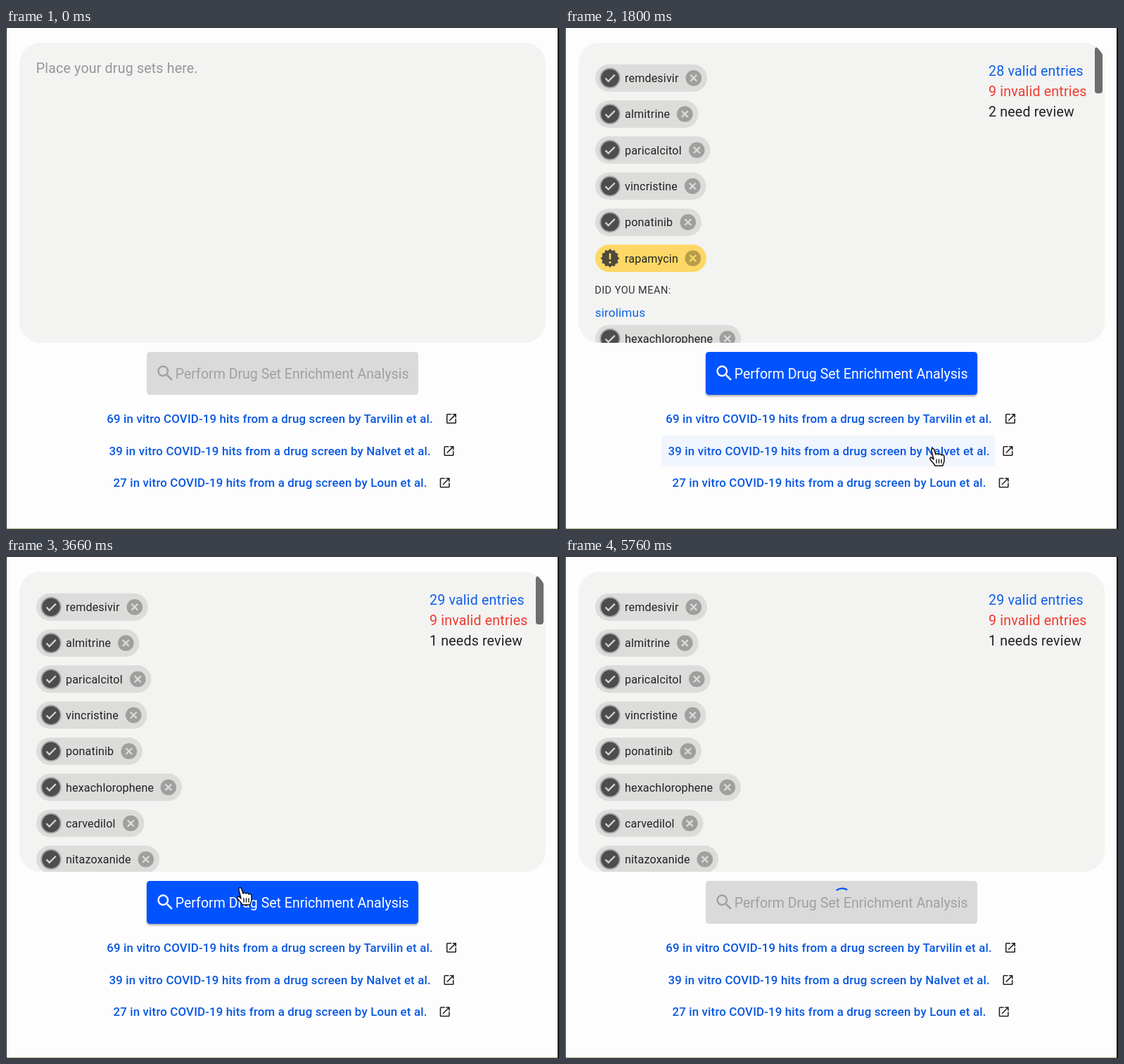
An HTML page that plays this animation: 786 by 713 pixels, repeating every 5.78 s.

```html
<!DOCTYPE html>
<html lang="en">
<head>
<meta charset="utf-8">
<title>Drug set enrichment</title>
<style>
  html, body { margin: 0; width: 100%; height: 100%; overflow: hidden; background: #fdfdfd; }
  svg { display: block; }
  text { font-family: Roboto, sans-serif; white-space: pre; }
  .body { font-size: 19.6px; letter-spacing: .00938em; }
  .chip { font-size: 16.1px; letter-spacing: .01em; fill: #222; }
  .link { font-size: 16.85px; letter-spacing: .01em; font-weight: 500; fill: #0957e0; }
</style>
</head>
<body>
<svg id="stage" width="786" height="713" viewBox="0 0 786 713">
  <defs>
    <clipPath id="panelClip"><rect x="19" y="21" width="748" height="427" rx="30"/></clipPath>
    <clipPath id="rowClip"><rect x="137" y="580" width="474" height="44" rx="4"/></clipPath>
    <filter id="shadow" x="-5%" y="-20%" width="110%" height="150%">
      <feDropShadow dx="0" dy="2" stdDeviation="1.5" flood-opacity=".35"/>
    </filter>
  </defs>
  <rect width="786" height="713" fill="#fdfdfd"/>
  <rect x="19" y="21" width="748" height="427" rx="30" fill="#f3f3f2"/>

  <text id="hint" class="body" x="42.7" y="64" fill="#979797">Place your drug sets here.</text>
  <g id="results" clip-path="url(#panelClip)">
    <g id="before"></g>
    <g id="after"></g>
    <text class="body" id="valid" x="602" y="67.5" fill="#0f5fe6"></text>
    <text class="body" x="602" y="96.5" fill="#ee3b2e">9 invalid entries</text>
    <text class="body" id="review" x="602" y="125.5" fill="#222"></text>
    <rect id="bar" x="753" y="27" width="11" rx="4" fill="#6d6d6d"/>
  </g>

  <rect id="button" x="200" y="461" width="386" height="61" rx="4.5"/>
  <g id="label">
    <path transform="translate(211.6 476.6) scale(1.23)" d="M15.5 14h-.79l-.28-.27A6.47 6.47 0 0 0 16 9.5 6.5 6.5 0 1 0 9.5 16c1.61 0 3.09-.59 4.23-1.57l.27.28v.79l5 4.99L20.49 19l-4.99-5zm-6 0C7.01 14 5 11.99 5 9.5S7.01 5 9.5 5 14 7.01 14 9.5 11.99 14 9.5 14z"/>
    <text x="240.8" y="498.5" font-size="19.55">Perform Drug Set Enrichment Analysis</text>
  </g>
  <path id="spinner" fill="none" stroke="#0957f0" stroke-width="2.4"/>

  <g id="hovers"></g>
  <g clip-path="url(#rowClip)"><circle id="ripple" cx="524.5" cy="602" fill="#0057ff"/></g>
  <g id="links"></g>

  <path d="M.5 0V713" stroke="#222"/>
  <path d="M785 0V713" stroke="#111" stroke-width="2"/>
  <path d="M1 712.5H784" stroke="#b5b58c"/>

  <g id="cursor" stroke-linejoin="round" stroke-linecap="round">
    <g id="hand">
      <path d="M-3 2c-1-4 3-5 4-1l2 6c1-2 4-1 4 0 1-1 4-1 4 1 2-1 4 0 4 2v6c0 3-2 4-2 7h-11c-1-3-4-5-7-9-1-2 1-4 3-2l2 2z" fill="#fff" stroke="#111" stroke-width="1.5"/>
      <path d="M4 14v5M7.5 14v5M11 14v5" stroke="#111" stroke-width="1.4"/>
    </g>
    <g id="beam" fill="none">
      <path d="M-4-11q4 0 4 3V8q0 3-4 3M4-11q-4 0-4 3M4 11q-4 0-4-3M-2 1H2" stroke="#fff" stroke-width="4"/>
      <path d="M-4-11q4 0 4 3V8q0 3-4 3M4-11q-4 0-4 3M4 11q-4 0-4-3M-2 1H2" stroke="#111" stroke-width="1.8"/>
    </g>
    <path id="arrow" d="M0 0V19l4.5-4 3 7 3.5-1.5-3-7h6z" fill="#111" stroke="#fff" stroke-width="1.5"/>
  </g>
</svg>
<script>
const LOOP = 5780, FILLED = 1260, FIXED = 3000, LOADING = 4167;
const $ = id => document.getElementById(id);
const show = (id, on) => $(id).style.display = on ? '' : 'none';
const set = (id, attrs) => { for (const k in attrs) $(id).setAttribute(k, attrs[k]); };
const clamp = v => Math.min(1, Math.max(0, v));
const smooth = v => v * v * (3 - 2 * v);

function bezier(x1, y1, x2, y2) {
  const at = (a, b, u) => 3 * a * u * (1 - u) ** 2 + 3 * b * u * u * (1 - u) + u ** 3;
  return x => {
    let lo = 0, hi = 1;
    for (let i = 0; i < 22; i++) {
      const mid = (lo + hi) / 2;
      if (at(x1, x2, mid) < x) lo = mid; else hi = mid;
    }
    return at(y1, y2, lo);
  };
}
const inOut = bezier(.42, 0, .58, 1), standard = bezier(.4, 0, .2, 1);

// Chips: name and right edge
const first = [['remdesivir', 202], ['almitrine', 189.5], ['paricalcitol', 206.5], ['vincristine', 200.5], ['ponatinib', 194]];
const hexa = ['hexachlorophene', 250];
const rowY = i => 71.2 + i * 51.3;

const burst = Array.from({ length: 24 }, (_, i) => {
  const a = i * Math.PI / 12, r = i % 2 ? 11 : 13.4;
  return [r * Math.sin(a), -r * Math.cos(a)].map(v => v.toFixed(1));
}).join(' ');

function chip([name, right], y, warn) {
  const fill = warn ? '#fdd866' : '#dcdcdb';
  const icon = warn
    ? `<polygon points="${burst}" fill="#4e4a3c"/><path d="M0-7V1.5M0 4.5V7.2" stroke="${fill}" stroke-width="2.6"/>`
    : `<circle r="14.8" fill="#a9a9a9"/><circle r="12.8" fill="#4d4d4d"/>
       <path d="M-6.5 .3L-2.4 4.6 6.8-4.6" fill="none" stroke="#d2d2d2" stroke-width="2.3"/>`;
  return `<g transform="translate(0 ${y})">
    <rect x="43" y="-19.5" width="${right - 43}" height="39" rx="19.5" fill="${fill}"/>
    <g transform="translate(64 0)">${icon}</g>
    <text class="chip" x="85" y="5.8">${name}</text>
    <g transform="translate(${right - 19.2} 0)"><circle r="11.3" fill="#000" fill-opacity=".28"/>
    <path d="M-4.4-4.4L4.4 4.4M4.4-4.4L-4.4 4.4" stroke="${fill}" stroke-width="2.2"/></g></g>`;
}

const top5 = first.map((c, i) => chip(c, rowY(i))).join('');
$('before').innerHTML = top5 + chip(['rapamycin', 201], rowY(5), true) + chip(hexa, 442.2) +
  `<text x="42.2" y="378.3" font-size="14.5" letter-spacing=".48" fill="#333">DID YOU MEAN:</text>
   <text x="42.7" y="411" font-size="17.1" letter-spacing=".17" fill="#0f62e2">sirolimus</text>`;
$('after').innerHTML = top5 + [hexa, ['carvedilol', 196.5], ['nitazoxanide', 218]]
  .map((c, i) => chip(c, rowY(5 + i))).join('');

// Links: count, author, text start, icon centre, row centre
const links = [[69, 'Tarvilin', 143.2, 633, 556], [39, 'Nalvet', 146.5, 629.5, 602], [27, 'Loun', 152.4, 623.7, 647.2]];
const rowBox = ([, , x, icon]) => [x - 9.5, icon - 18.5];
$('links').innerHTML = links.map(([n, who, x, icon, y]) =>
  `<text class="link" x="${x}" y="${y + 6.2}">${n} in vitro COVID-19 hits from a drug screen by ${who} et al.</text>
   <path transform="translate(${icon} ${y}) scale(.78) translate(-12 -12)" fill="#222" d="M19 19H5V5h7V3H5a2 2 0 0 0-2 2v14a2 2 0 0 0 2 2h14c1.1 0 2-.9 2-2v-7h-2v7zM14 3v2h3.59l-9.83 9.83 1.41 1.41L19 6.41V10h2V3h-7z"/>`).join('');
$('hovers').innerHTML = links.map((l, i) => {
  const [a, b] = rowBox(l);
  return `<rect id="hover${i}" x="${a}" y="${l[4] - 22}" width="${b - a}" height="44" rx="4" fill="#f0f5fe"/>`;
}).join('');

// Pointer stops: time, x, y
const stops = [[480, 570, 735], [1000, 524, 600], [1860, 524, 600], [2440, 45, 377], [2640, 78, 404],
  [3060, 78, 404], [3620, 334, 472], [4460, 334, 472], [4780, 380, 740]];

function pointer(t) {
  const i = stops.findIndex(s => s[0] > t);
  if (i < 1) return null;
  const [t0, x0, y0] = stops[i - 1], [t1, x1, y1] = stops[i];
  const k = smooth((t - t0) / (t1 - t0));
  return [x0 + (x1 - x0) * k, y0 + (y1 - y0) * k];
}

function drawPointer(t) {
  const p = pointer(t);
  show('cursor', p);
  const [x, y] = p || [-99, -99];
  const inside = (a, b, c, d) => x > a && x < b && y > c && y < d;
  let hand = t < LOADING && t > FILLED && inside(200, 586, 461, 522);
  links.forEach((l, i) => {
    const on = inside(...rowBox(l), l[4] - 22, l[4] + 22);
    show('hover' + i, on);
    hand = hand || on;
  });
  if (t > FILLED && t < FIXED && inside(43, 113, 393, 416)) hand = true;
  const beam = !hand && inside(19, 767, 21, 448);
  show('hand', hand);
  show('beam', beam);
  show('arrow', !hand && !beam);
  set('cursor', { transform: `translate(${x} ${y})` });
}

function drawSpinner(t) {
  const p = (t - LOADING) / 866 % 1;
  const k = inOut(p < .5 ? p * 2 : p * 2 - 1);
  const start = p < .5 ? 15 * k : 15 + 110 * k;
  const length = p < .5 ? 1 + 99 * k : 100;
  const full = 126.9, r = 13.4;
  const point = u => {
    const a = (u / full + p) * 2 * Math.PI;
    return `${394 + r * Math.cos(a)} ${485 + r * Math.sin(a)}`;
  };
  const end = Math.min(start + length, full);
  set('spinner', { d: `M${point(start)}A${r} ${r} 0 ${end - start > full / 2 ? 1 : 0} 1 ${point(end)}` });
}

function draw(t) {
  const filled = t >= FILLED, fixed = t >= FIXED, loading = t >= LOADING;
  const enabled = filled && !loading;
  show('hint', !filled);
  show('results', filled);
  show('before', !fixed);
  show('after', fixed);
  $('valid').textContent = (fixed ? 29 : 28) + ' valid entries';
  $('review').textContent = fixed ? '1 needs review' : '2 need review';
  show('bar', !loading);
  set('bar', { height: fixed ? 69 : 66 });
  set('button', { fill: enabled ? '#0052ff' : '#dadada', filter: enabled ? 'url(#shadow)' : 'none' });
  set('label', { fill: enabled ? '#fff' : '#a0a0a0' });

  const grow = clamp((t - 1125) / 342);
  set('ripple', {
    r: 390 * standard(grow),
    opacity: t < 1125 ? 0 : (.1 + .2 * clamp(grow * 2.4)) * (1 - standard(clamp((t - 1220) / 340)))
  });
  show('spinner', loading);
  if (loading) drawSpinner(t);
  drawPointer(t);
}

function tick() {
  draw(performance.now() % LOOP);
  requestAnimationFrame(tick);
}
tick();
</script>
</body>
</html>
```
